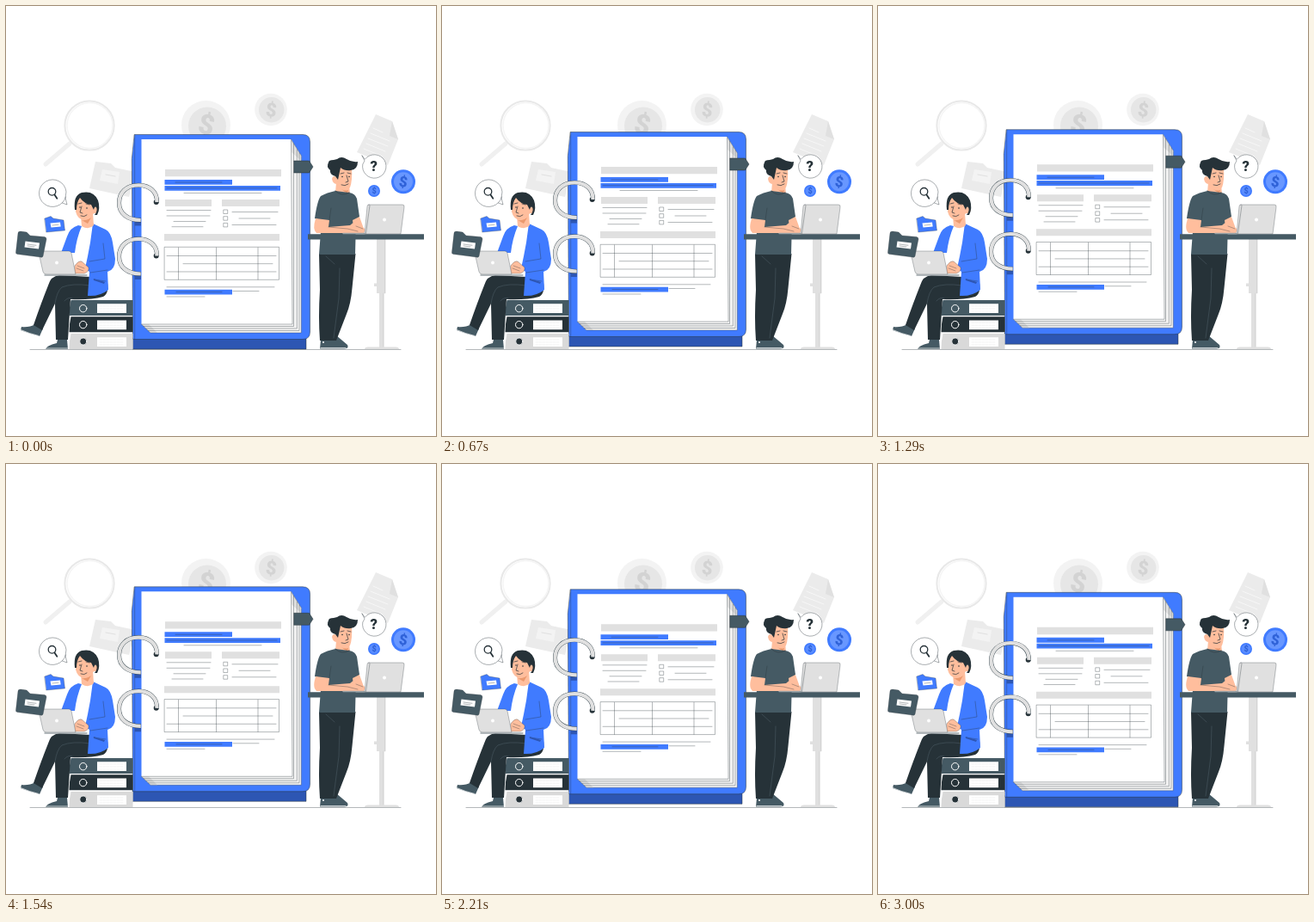
Recreate the animation shown at these times as an HTML page. Size 500x500 px, loop 3040 ms.

```html
<!DOCTYPE html>
<html lang="en">
<head>
<meta charset="utf-8">
<title>Binder at work</title>
<style>
html, body { margin: 0; width: 100%; height: 100%; overflow: hidden; background: #fff; }
svg { display: block; width: 100vw; height: 100vh; }
text { font-family: Roboto, Arial, sans-serif; font-weight: 900; text-anchor: middle; }
.blue { fill: #407bff; }
.navy { fill: #2d56b3; }
.dark { fill: #263238; }
.slate { fill: #455a64; }
.grey { fill: #e0e0e0; }
.pale { fill: #ebebeb; }
.mist { fill: #f3f3f3; }
.white { fill: #fff; }
.skin { fill: #ffbe9d; }
.ink { stroke: #263238; stroke-width: .5; }
.hair { stroke: #263238; stroke-width: .35; fill: none; }
.light { stroke: #fff; fill: none; }
</style>
</head>
<body>
<svg viewBox="0 0 500 500" stroke-linejoin="round" stroke-linecap="round">
  <defs>
    <g id="ring" fill="none" stroke-linecap="butt">
      <circle class="dark" cx="174.700" cy="228" r="3"/>
      <path class="navy" d="M149.500 249H157V255.500H149.500Z"/>
      <path d="M175.500 228.500C176 216 167 208.300 154 208.300C140 208.300 131.500 217 131.500 229C131.500 241 141 249 157 249" stroke="#37474f" stroke-width="5"/>
      <path d="M175.500 228C176 216 167 208.300 154 208.300C140 208.300 131.500 217 131.500 229C131.500 241 141 249 156.700 249" stroke="#e0e0e0" stroke-width="4.200"/>
    </g>
    <g id="binder">
      <path d="M75.500 342H147.500V360H73.500Q73.500 350 75.500 342Z"/>
      <path class="white" d="M106 346.300H140V357H106Z"/>
      <path d="M109 349H137M109 352H137M109 355H137" stroke="#ececec" stroke-width=".7" stroke-dasharray="3 1"/>
    </g>
  </defs>

  <!-- backdrop -->
  <path d="M74 160L46 184" stroke="#f0f0f0" stroke-width="5"/>
  <circle cx="97" cy="139" r="28.600" fill="#fff" stroke="#e8e8e8" stroke-width="2"/>
  <circle cx="97.500" cy="139" r="26.500" fill="none" stroke="#f5f5f5" stroke-width="1.500"/>
  <path class="pale" d="M104 181L122 183L127 188L150 193L143 222L97 212Z"/>
  <path class="mist" d="M112 190L132 193L130 207L109 203Z"/>
  <path d="M116 196L127 198" stroke="#e0e0e0"/>

  <circle class="mist" cx="232.500" cy="138.500" r="28.500"/>
  <circle cx="234" cy="139.500" r="22" fill="#e6e6e6"/>
  <text x="233" y="149" font-size="32" fill="#d3d3d3" transform="rotate(12 233 138)">$</text>
  <circle class="mist" cx="308" cy="120.500" r="18.800"/>
  <circle cx="308.700" cy="120.700" r="14.700" fill="#e6e6e6"/>
  <text x="308.500" y="128.500" font-size="22" fill="#d3d3d3" transform="rotate(6 308 121)">$</text>

  <path class="pale" d="M430 126L449 134L456 155L444 185L408 170Z"/>
  <path class="grey" d="M449 134L456 155L446 151Z"/>
  <path d="M427 142L438 147M424 148L446 157M421 154L444 163M419 160L441 169M416 166L438 175" stroke="#f7f7f7"/>
  <path d="M28 399.500H459" class="hair"/>

  <g id="book">
    <path class="navy ink" d="M147.500 386H349V399H147.500Z"/>
    <path class="blue ink" d="M149.500 149.500H345Q353.500 149.500 353.500 158V379Q353.500 387.500 345 387.500H147.500L146.300 178Z"/>
    <path class="hair" d="M149.700 150V387"/>
    <path class="mist" d="M331.500 155L343.300 174V380H168L157.500 370Z"/>
    <path class="grey" d="M331.500 155L343.300 174V180L332 170ZM157.500 370L168 380H176L166 370Z"/>
    <path class="hair" d="M332 156L343.300 174V380H168L157.500 370M334.500 160V372.500H160M338.300 167V375H163M341 171V377.500H165.500"/>
    <path class="white" d="M157.500 155H331.500L333 370H157.500Z"/>
    <path class="hair" d="M331.500 155L333 370H157.500"/>
    <path class="slate ink" d="M335 180H352.500L357 187L352.500 194H335Z"/>

    <path class="grey" d="M185 190H320V198.300H185ZM185 225H239V233H185ZM251 225H318V233H251ZM184 265H318V273H184Z"/>
    <path class="blue" d="M184.500 202H263V207.800H184.500ZM184.500 208.900H319V214.700H184.500ZM184.500 329.700H263V335.500H184.500Z"/>
    <path class="hair" d="M197 205H251M187 211.700H315M207 217.500H297
      M187 237.500H238M187 244H237M195 250.500H232M193 256.700H229
      M263 239.500H316M271 247H307M263 254.500H314
      M253.200 237H257.700V241.500H253.200ZM253.200 244.700H257.700V249.200H253.200ZM253.200 252.400H257.700V256.900H253.200Z
      M184.500 280.300H317.500V318.300H184.500ZM200.500 281V318M244.500 281V318M293 281V318
      M187 290.500H314M206 299.700H310M187 309H314
      M187 326.800H312M198 332.500H251M264 331.500H294M187 338H231"/>
    <use href="#ring"/>
    <use href="#ring" y="62.500"/>
  </g>

  <!-- stacked binders -->
  <use href="#binder" class="slate"/>
  <use href="#binder" class="dark" y="19.300"/>
  <use href="#binder" fill="#d9d9d9" y="39"/>
  <circle class="light" cx="89.700" cy="351.700" r="4.200"/>
  <circle class="light" cx="89.700" cy="370.600" r="4.200"/>
  <circle class="dark" cx="89.700" cy="390" r="4" stroke="#fff" stroke-width=".8"/>

  <!-- seated worker -->
  <path class="slate" d="M34 370L43 375L39 384Q27 381 17 377L18 373Q27 374 34 370ZM60 388H71L72 399H46Q47 395 59 392Z"/>
  <path class="light" d="M17 376.500Q27 381 38 383.500M46 398H72" stroke-width=".7"/>
  <path class="dark" d="M62 313L117 316Q121 334 113 338Q98 342 75 341L72 388H58L57 346L42 377L32 371Q41 345 49 325Q52 314 62 313Z"/>
  <path d="M98 325Q77 322 65 327Q59 332 57 346M77 340Q72 338 68 343" fill="none" stroke="#50606a" stroke-width=".5"/>
  <path class="white" d="M84 255L102 254L100 300L80 306L80 275Z"/>
  <path class="blue" d="M84 255Q74 258 71 268L64 287H80Q82 270 88 256ZM101 253L116 260Q122 263 124 275L127 294Q127 307 118 309L119 330Q109 338 95 337L97 309L92 305L95 291L98 275Z"/>
  <path class="hair" d="M113 276L115 294L97 297M98 310L118 307M102 318L116 320"/>
  <path class="navy" d="M102 317L115 321L114 323L102 319Z"/>
  <path class="skin" d="M87 244L101 241L102 255Q96 261 88 256Z"/>
  <path d="M88 249Q94 250 99 246L95 253Z" fill="#eb996e"/>
  <path class="skin" d="M82 224Q92 219 103 227L104 234Q108 232 108 237Q107 242 102 241Q99 248 91 249Q83 248 81 239Z"/>
  <path class="dark" d="M80 237Q78 220 88 217Q102 214 107 226Q110 235 106 243L103 243Q107 238 105 234Q103 232 102 237L99 231Q91 230 86 223Q82 228 82 237Z"/>
  <path class="hair" d="M84 230L88 229M93 230L97 231M88 233L86 240L89 241M87 244Q91 246 94 243" style="stroke-width:.7"/>
  <circle class="dark" cx="86" cy="234" r=".8"/><circle class="dark" cx="94" cy="235" r=".8"/>
  <path class="skin ink" d="M80 302Q84 296 88 297L96 304Q97 309 91 311L80 311Z" style="stroke-width:.3"/>
  <path class="hair" d="M83 302L91 305M82 305L90 308"/>
  <path class="grey ink" d="M40 285H73Q75 285 76 287L81 312H47Q44 312 43 309L38 287Q38 285 40 285Z" style="stroke-width:.3"/>
  <path d="M45 313H94" stroke="#9aa3a7" stroke-width="1.300"/>
  <circle class="white" cx="59" cy="298.500" r="1.900"/>

  <!-- left icons -->
  <path class="white ink" d="M69.500 222A15.800 15.800 0 1 1 70 216L69 223L71 231L65.500 229" style="stroke-width:.4"/>
  <g fill="none" class="ink" style="stroke-width:1.300">
    <circle cx="53.500" cy="215.800" r="4.300"/>
    <path d="M56.500 219.500L59.300 223.800" style="stroke-width:1.800"/>
  </g>
  <path class="blue ink" d="M45 247L52 244.500L55 247L67 249L68.500 261L47 263Z" style="stroke-width:.3"/>
  <path class="white" d="M51.500 252.500L63 251.500L63.700 256.500L52.500 257.500Z"/>
  <path class="hair" d="M54 255L61 254.300"/>
  <path class="slate ink" d="M14 264Q14 262 17 262L24 263L28 267L45 268.500Q47 269 47 271L43 291Q42 293 40 292L13 288.500Q11 288 11.500 286Z" style="stroke-width:.3"/>
  <path class="white" d="M22.500 273.500L39 275.500L38 282.500L21.500 280.500Z"/>
  <path class="hair" d="M25 277L35 278.300M25 279L33 280"/>

  <!-- standing worker -->
  <path class="slate" d="M366 388H381L395 395Q397 398 394 398.500H365ZM384 383L397 394Q399 398 394 398.500L382 392Z"/>
  <path class="light" d="M366 397.500H395" stroke-width=".7"/>
  <circle class="white" cx="369" cy="391" r="1"/>
  <path class="dark" d="M364 288H406.500L402.500 328Q401 346 396 358L384 389H365Q363 362 365 330Z"/>
  <path d="M388 305L387 340L381 386M372 291L382 300" fill="none" stroke="#50606a" stroke-width=".5"/>
  <path class="skin" d="M384 205L399 207L400 219Q391 225 383 217Z"/>
  <path d="M387 211Q393 216 398 214L397 218Z" fill="#eb996e"/>
  <path class="slate" d="M383 215L399 217Q406 218 408 224L411 245L407 249L406 289H364L367 249L359 247Q362 226 366 221Q373 217 383 215Z"/>
  <path d="M383 215Q390 222 399 217" fill="none" stroke="#37474f"/>
  <path class="skin" d="M360 247L376 249L375 257L400 255L411 246L415 257Q419 260 416 264H361Q356 260 360 247ZM403 249L411 245L416 259L404 258Z"/>
  <path class="hair" d="M375 257L397 259L409 262M407 256L415 259M378 235L376 249"/>
  <path class="skin" d="M383 188L402 188Q403 203 400 211Q396 215 390 212L385 207Q380 207 379 201Q380 196 384 199Z"/>
  <path class="dark" d="M383 198Q376 196 377 191Q372 187 375 182Q375 179 381 179L385 178Q390 174 396 178Q402 182 409 181Q409 190 401 191Q394 192 389 188L386 202Z"/>
  <path class="hair" d="M389 195L393 194M397 194L401 195M396 197L398 204L395 205M390 208Q394 210 398 207" style="stroke-width:.7"/>
  <circle class="dark" cx="391" cy="198.500" r=".8"/><circle class="dark" cx="399" cy="198.500" r=".8"/>

  <!-- desk -->
  <path class="grey" d="M431 271H441.500V334H431ZM434 334H439.500V397H434ZM417 399Q417 396.500 421 396.500H453Q457 396.500 457 399ZM428 322.500H431V326H428Z"/>
  <path d="M440.500 271V334M438.800 334V396" stroke="#cfcfcf" stroke-width=".7"/>
  <path class="slate" d="M351 265.300H486V271.500H351Z"/>
  <path d="M392 264.500H418" stroke="#9aa3a7" stroke-width="1.300"/>
  <path class="grey ink" d="M422 231H461Q463.500 231 463 234L459 265H417L420 233Q420 231 422 231Z" style="stroke-width:.3"/>
  <path class="hair" d="M423 232L418.500 264.500"/>
  <circle class="white" cx="440" cy="248.500" r="2"/>

  <!-- right icons -->
  <path class="white ink" d="M417.500 178A13.700 13.700 0 1 1 414.800 184L417 180L414 174Z" style="stroke-width:.4"/>
  <text x="427.800" y="191.700" font-size="16.500" class="dark">?</text>
  <circle class="blue" cx="428" cy="215" r="7"/>
  <circle cx="428" cy="215" r="5.300" fill="#5a8dff"/>
  <text x="428" y="218.300" font-size="9" fill="#2f62d8">$</text>
  <circle class="blue" cx="462" cy="204.300" r="14"/>
  <circle cx="462" cy="204.300" r="11" fill="#6897ff"/>
  <text x="462" y="210.300" font-size="17" fill="#2f62d8" transform="rotate(8 462 204)">$</text>
</svg>
<script>
const LOOP = 3040, RISE = 6.8;
const book = document.getElementById('book');

// The binder glides up at a steady pace, then back down.
function draw(now) {
  const phase = now % LOOP / LOOP;
  const lift = RISE * (1 - Math.abs(1 - 2 * phase));
  book.setAttribute('transform', `translate(0 ${-lift})`);
  requestAnimationFrame(draw);
}
requestAnimationFrame(draw);
</script>
</body>
</html>
```
